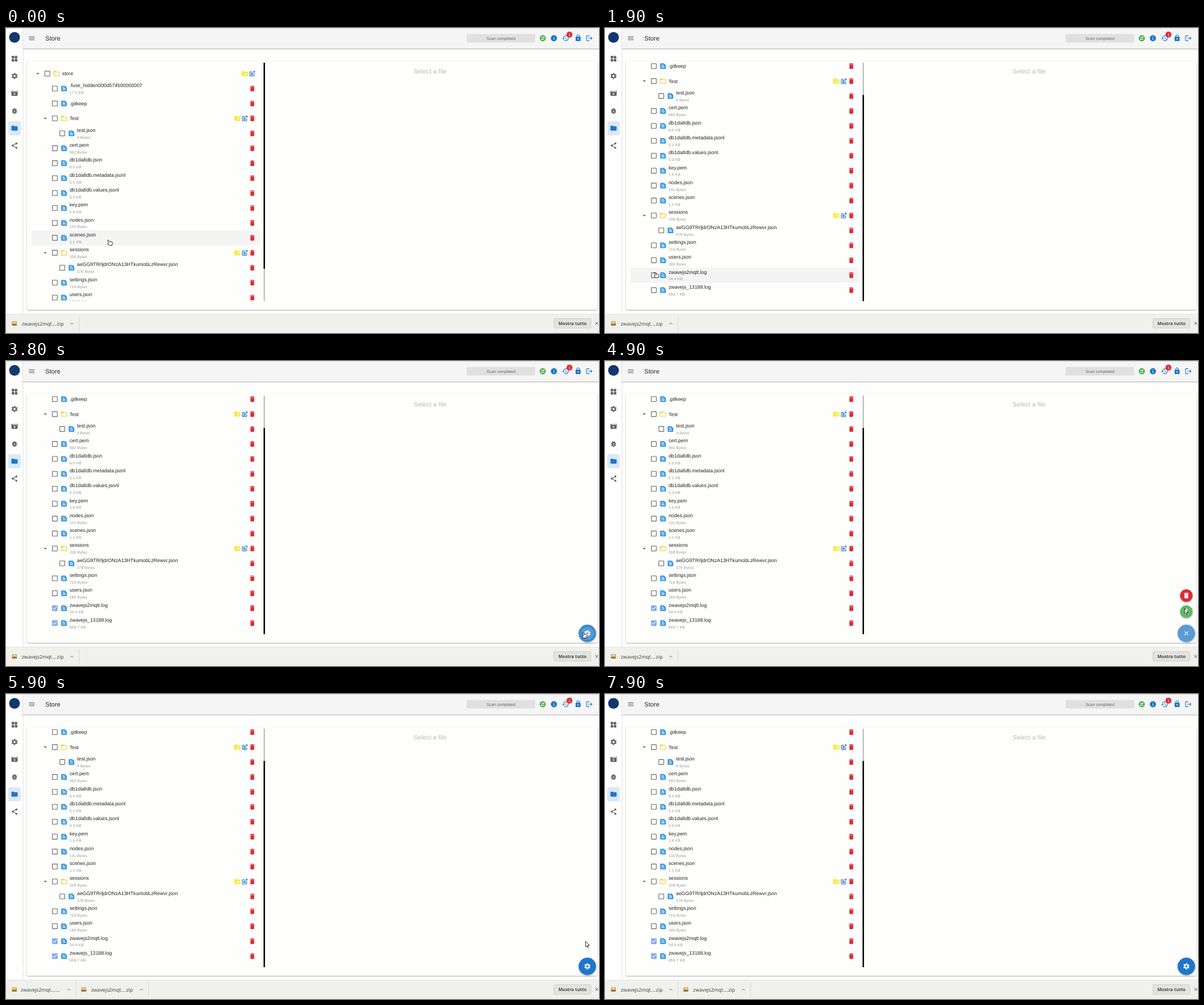
Animation of 1044x537 px, one loop 8000 ms. Source, as an HTML page:

```html
<!DOCTYPE html>
<html lang="en">
<head>
<meta charset="utf-8">
<title>Store</title>
<style>
html, body { margin: 0; width: 100%; height: 100%; overflow: hidden; background: #fefefd; }
svg { display: block; width: 1044px; height: 537px; }
text { font-family: "Liberation Sans", Arial, sans-serif; text-rendering: geometricPrecision; fill: #222; white-space: pre; }
.name { font-size: 8.76px; }
.size { font-size: 6.57px; letter-spacing: .22px; fill: #929292; }
.title { font-size: 10.96px; letter-spacing: .137px; }
.shelf { font-family: "Noto Sans", "Open Sans", sans-serif; font-size: 8.67px; fill: #444; }
.card { filter: drop-shadow(0 1px 1px #0005); }
.fab { filter: drop-shadow(0 1.5px 1.5px #0005); }
</style>
</head>
<body>
<svg viewBox="0 0 1044 537">
  <defs><clipPath id="view"><rect x="40" y="61" width="413" height="420"/></clipPath></defs>
  <g id="page"></g>
  <g id="live"></g>
</svg>
<script>
const LOOP = 8000, STEP = 100, PITCH = 26.29, MAX_SCROLL = 65.7;
const BLUE = '#1f76cc', LIGHT_BLUE = '#5a9bd5', RED = '#e02b33', GREY = '#616161';

// Icons on a 24 unit grid
const BOX = 'M19,3H5A2,2 0 0 0 3,5V19A2,2 0 0 0 5,21H19A2,2 0 0 0 21,19V5A2,2 0 0 0 19,3Z';
const FOLDER = 'M10,4H4A2,2 0 0 0 2,6V18A2,2 0 0 0 4,20H20A2,2 0 0 0 22,18V8A2,2 0 0 0 20,6H12Z';
const DISC = 'M12,2A10,10 0 0 0 12,22A10,10 0 0 0 12,2Z';
const ICONS = {
  menu: 'M3,6H21V8H3ZM3,11H21V13H3ZM3,16H21V18H3Z',
  widgets: 'M13,13V21H21V13ZM3,21H11V13H3ZM3,3V11H11V3ZM16.7,1.7L11,7.3 16.7,13 22.3,7.3Z',
  movie: 'M18,4L20,8H17L15,4H13L15,8H12L10,4H8L10,8H7L5,4H4A2,2 0 0 0 2,6V18A2,2 0 0 0 4,20H20A2,2 0 0 0 22,18V4ZM12,10L13.2,12.8 16,14 13.2,15.2 12,18 10.8,15.2 8,14 10.8,12.8Z',
  bug: 'M20,8H17.2L15.4,6 17,4.4 15.6,3 13.4,5.2H10.6L8.4,3 7,4.4 8.6,6 6.8,8H4V10H6V12H4V14H6V16H4V18H6.8A6,6 0 0 0 17.2,18H20V16H18V14H20V12H18V10H20ZM10,10H14V12H10ZM10,14H14V16H10Z',
  folder: FOLDER,
  folderOpen: FOLDER + 'M20,18H4V8H20Z',
  folderAdd: FOLDER + 'M19,14H16V17H14V14H11V12H14V9H16V12H19Z',
  fileAdd: 'M17,19H5V7H12V5H5A2,2 0 0 0 3,7V19A2,2 0 0 0 5,21H17A2,2 0 0 0 19,19V12H17ZM19,2H17V5H14V7H17V10H19V7H22V5H19ZM7,9H15V11H7ZM7,12H15V14H7ZM7,15H15V17H7Z',
  file: 'M20.4,8.4L15.6,3.6A2,2 0 0 0 14.2,3H5A2,2 0 0 0 3,5V19A2,2 0 0 0 5,21H19A2,2 0 0 0 21,19V9.8A2,2 0 0 0 20.4,8.4ZM7,7H14V9H7ZM17,17H7V15H17ZM17,13H7V11H17Z',
  trash: 'M19,4H15.5L14.5,3H9.5L8.5,4H5V6H19ZM6,19A2,2 0 0 0 8,21H16A2,2 0 0 0 18,19V7H6Z',
  down: 'M7,10L12,15 17,10Z',
  off: BOX + 'M19,5V19H5V5Z',
  on: BOX + 'M10,17L5,12 6.4,10.6 10,14.2 17.6,6.6 19,8Z',
  swap: DISC + 'M18,9L14.5,5.5V8H7V10H14.5V12.5ZM6,15L9.5,11.5V14H17V16H9.5V18.5Z',
  info: DISC + 'M11,7H13V9H11ZM11,11H13V17H11Z',
  history: 'M13.5,8H12V13L16.3,15.5 17,14.3 13.5,12.2ZM13,3A9,9 0 0 0 4,12H1L5,16 9,12H6A7,7 0 1 1 8.1,16.9L6.6,18.4A9,9 0 1 0 13,3Z',
  lock: 'M18,8H17V6A5,5 0 0 0 7,6V8H6A2,2 0 0 0 4,10V20A2,2 0 0 0 6,22H18A2,2 0 0 0 20,20V10A2,2 0 0 0 18,8ZM9,8V6A3,3 0 0 1 15,6V8ZM12,13A2,2 0 0 0 12,17A2,2 0 0 0 12,13Z',
  exit: 'M17,7L15.6,8.4 18.2,11H8V13H18.2L15.6,15.6 17,17 22,12ZM4,5H12V3H4A2,2 0 0 0 2,5V19A2,2 0 0 0 4,21H12V19H4Z',
  close: 'M19,6.4L17.6,5 12,10.6 6.4,5 5,6.4 10.6,12 5,17.6 6.4,19 12,13.4 17.6,19 19,17.6 13.4,12Z',
  save: 'M5,20H19V18H5ZM19,9H15V3H9V9H5L12,16Z',
  tray: 'M16,2H8V9H3L12,18 21,9H16ZM1,26H23V28H1Z',
};

// name, size, depth, folder
const ROWS = [
  ['store', '', 0, 1],
  ['.fuse_hidden000d574500000007', '17.1 KB', 1],
  ['.gitkeep', '', 1],
  ['Test', '', 1, 1],
  ['test.json', '4 Bytes', 2],
  ['cert.pem', '992 Bytes', 1],
  ['db1da8db.json', '6.0 KB', 1],
  ['db1da8db.metadata.jsonl', '5.1 KB', 1],
  ['db1da8db.values.jsonl', '5.3 KB', 1],
  ['key.pem', '1.6 KB', 1],
  ['nodes.json', '131 Bytes', 1],
  ['scenes.json', '1.1 KB', 1],
  ['sessions', '208 Bytes', 1, 1],
  ['aeGG9TRrljdrONzA13HTkumobLzRewvr.json', '378 Bytes', 2],
  ['settings.json', '719 Bytes', 1],
  ['users.json', '186 Bytes', 1],
  ['zwavejs2mqtt.log', '34.4 KB', 1],
  ['zwavejs_13188.log', '659.7 KB', 1],
];
const CHECKED_AT = { 16: 2000, 17: 2500 };
const HOVER = [[0, 11], [500, 12], [800, 14], [900, 16], [1000, 17], [1300, 16], [2300, 17], [3000, -1]];
const PATH = [
  [0, 183, 378], [300, 183, 378], [700, 173, 394], [1100, 99, 472], [1200, 99, 472],
  [1300, 91, 440], [1400, 91, 440], [1500, 91, 429], [1800, 91, 429], [1900, 90.5, 435],
  [2100, 90.5, 437], [2300, 90.5, 462], [2700, 90.5, 462], [3200, 1006, 491], [3500, 1006, 491],
  [3700, 1018.5, 483], [4100, 1018.5, 483], [4400, 1023, 446], [4600, 1023.5, 441], [LOOP, 1023.5, 441],
];

const ramp = (t, from, to) => Math.min(1, Math.max(0, (t - from) / (to - from)));
const easeOut = p => 1 - (1 - p) ** 2;
const rect = (x, y, w, h, fill, more = '') =>
  `<rect x="${x}" y="${y}" width="${w}" height="${h}" fill="${fill}" ${more}/>`;
const circle = (x, y, r, fill, more = '') => `<circle cx="${x}" cy="${y}" r="${r}" fill="${fill}" ${more}/>`;
const text = (x, y, s, cls, more = '') => `<text x="${x}" y="${y}" class="${cls}" ${more}>${s}</text>`;
const icon = (name, x, y, fill, scale = .548) =>
  `<path d="${ICONS[name]}" fill="${fill}" fill-rule="evenodd" transform="translate(${x} ${y}) scale(${scale}) translate(-12 -12)"/>`;
const gear = (x, y, color, turn = 0) =>
  `<g transform="translate(${x} ${y}) scale(.548) rotate(${turn})" fill="none" stroke="${color}">
  <circle r="5.4" stroke-width="3.8"/>
  <circle r="8.4" stroke-width="3" pathLength="12" stroke-dasharray="1 1" stroke-dashoffset="-.5"/></g>`;

function drawPage() {
  let s = '';
  // Side bar and tool bar
  s += rect(0, 0, 30, 504, '#fff') + rect(29.5, 36, 1, 468, '#e0e0e0');
  s += `<g class="card">${rect(30, 0, 1014, 36, '#f5f5f5')}</g>` + rect(0, 0, 1044, 1, '#d6d6d4');
  s += circle(15, 16.5, 9.5, '#12386f');
  s += rect(4, 164, 22, 25, '#dce9f6', 'rx="2"');
  s += icon('widgets', 15, 54, GREY) + gear(15, 84.5, GREY) + icon('movie', 15, 115, GREY);
  s += icon('bug', 15, 146, GREY) + icon('folder', 15, 176.3, BLUE);
  s += `<path d="M18.3 203.2L11.7 207 18.3 210.9" fill="none" stroke="${GREY}" stroke-width="1.1"/>`;
  for (const [x, y] of [[18.3, 203.2], [11.7, 207], [18.3, 210.9]]) s += circle(x, y, 1.7, GREY);
  s += icon('menu', 45.3, 18, GREY) + text(69.2, 22, 'Store', 'title');
  s += rect(811, 10.5, 120.5, 15, '#e0e0e0', 'rx="2"');
  s += text(871.5, 20.7, 'Scan completed', '', 'font-size="7.12" text-anchor="middle" style="fill:#666"');
  s += icon('swap', 945, 18, '#4caf50') + icon('info', 964.6, 18, BLUE) + icon('history', 985.3, 18, BLUE);
  s += icon('lock', 1007.2, 17.5, BLUE) + icon('exit', 1027, 18, BLUE);
  s += circle(992, 11.5, 5.2, RED) + text(992, 14, '1', '', 'font-size="6.6" text-anchor="middle" style="fill:#fff"');
  // Card
  s += `<g class="card">${rect(37, 58, 1004, 438, '#fefefd', 'rx="2"')}</g>`;
  s += text(746.8, 80, 'Select a file', 'title', 'text-anchor="middle" style="fill:#b8b8b8"');
  s += rect(453.5, 61, 2.5, 420, '#c1c1c1');
  // Download shelf
  s += rect(0, 503.5, 1044, 33.5, '#f0f0ec') + rect(0, 503.5, 1044, .7, '#d9d9d5');
  s += rect(964.7, 511.7, 65, 16.6, '#e3e3df', 'rx="2" stroke="#c2c2be" stroke-width=".7"');
  s += text(997.3, 523, 'Mostra tutto', 'shelf', 'text-anchor="middle" style="font-size:7.8px;font-weight:600"');
  s += icon('close', 1040, 520, '#555', .38);
  return s;
}

function drawRow([name, size, depth, isFolder], i, t, scroll) {
  const y = 80.3 + i * PITCH - scroll, dx = depth * 13.15;
  const on = t >= CHECKED_AT[i], age = t - CHECKED_AT[i];
  let s = '';
  if (isFolder) s += icon('down', 56 + dx, y, GREY);
  if (age >= 0 && age < 300) s += circle(72.8 + dx, y, 6 + age / 60, '#82b1ff', 'opacity=".2"');
  s += icon(on ? 'on' : 'off', 72.8 + dx, y, on ? '#82abef' : '#666');
  s += isFolder ? icon('folderOpen', 89 + dx, y, '#f5cc2b') : icon('file', 89 + dx, y, '#2b93e4');
  s += text(98.8 + dx, y + (size ? -2.6 : 3.1), name, 'name');
  if (size) s += text(98.8 + dx, y + 9.2, size, 'size');
  const right = 433.6 - (depth ? 13.15 : 0);
  if (isFolder) s += icon('folderAdd', right - 13.15, y, '#f5ec3e') + icon('fileAdd', right, y, BLUE);
  if (depth) s += icon('trash', 433.6, y, RED);
  return s;
}

function drawTree(t) {
  const scroll = t < 400 ? 0 : MAX_SCROLL * easeOut(ramp(t, 300, 850));
  const hover = HOVER.filter(h => h[0] <= t).pop()[1];
  let s = '<g clip-path="url(#view)">';
  if (hover >= 0) s += rect(45, 67.2 + hover * PITCH - scroll, 402, PITCH, '#f4f4f4');
  s += ROWS.map((row, i) => drawRow(row, i, t, scroll)).join('') + '</g>';
  return s + rect(453.5, 61 + scroll * .866, 2.5, 363, '#000');
}

function button(x, y, r, fill, scale, content) {
  if (!scale) return '';
  return `<g transform="translate(${x} ${y}) scale(${scale})"><g class="fab">${circle(0, 0, r, fill)}</g>${content}</g>`;
}

function drawFab(t) {
  const dial = ramp(t, 3900, 4200) * (1 - ramp(t, 5000, 5300));
  const lit = t >= 3600 && t < 5200;
  let s = button(1023.5, 413, 11, RED, dial, icon('trash', 0, 0, '#fff'));
  s += button(1023.5, 441.3, 11, t >= 4500 ? '#5fb964' : '#4caf50', ramp(dial, .2, 1), icon('save', 0, 0, '#fff'));
  const ripple = lit && t < 4000 ? circle(0, 0, 11 * ramp(t, 3600, 3800), LIGHT_BLUE) : '';
  const fill = !lit ? BLUE : t < 4000 ? '#3f8acb' : LIGHT_BLUE;
  const face = dial > .5 ? icon('close', 0, 0, '#fff') : gear(0, 0, '#fff', dial * 90);
  return s + button(1023.5, 479.5, 15.3, fill, ramp(t, 1900, 2200), ripple + face);
}

function download(x, width, label, textX) {
  let s = rect(x + 10.5, 516.3, 8.6, 7.6, '#d3ac68', 'rx=".8"') + rect(x + 10.5, 521, 8.6, 2.9, '#9a7440', 'rx=".8"');
  s += rect(x + 12.5, 518, 4.6, 1.2, '#fff3d6');
  s += text(x + textX, 523.6, label, 'shelf');
  s += `<path d="M${x + width - 15.3} 521.8l2.5-2.5 2.5 2.5" fill="none" stroke="#666"/>`;
  return s + rect(x + width - .4, 507, .8, 27, '#d0d0cc');
}

function drawShelf(t) {
  const label = 'zwavejs2mqt….zip', tight = t >= 5500 && t < 6200;
  let s = tight ? download(0, 123.3, 'zwavejs2mqt….…', 26) : download(0, 128.7, label, 27.8);
  if (t >= 5500) {
    const x = tight ? 123.3 : 128.7;
    s += `<g opacity="${ramp(t, 5400, 5700)}">${download(x - 1.2, 128.8, label, 27.6)}</g>`;
  }
  const p = ramp(t, 5320, 5920);
  if (p > 0 && p < 1)
    s += `<g opacity="${(4 * p * (1 - p)) ** 1.5}">${icon('tray', 19.5, 485 - 35 * (1 - p), '#a5a9ad', .65)}</g>`;
  return s;
}

function drawCursor(t) {
  if (t >= 6900) return '';
  const k = PATH.findIndex(q => q[0] > t), [t0, x0, y0] = PATH[k - 1], [t1, x1, y1] = PATH[k];
  const p = ramp(t, t0, t1), x = x0 + (x1 - x0) * p, y = y0 + (y1 - y0) * p;
  const hand = t < 4800 && (x < 450 || x > 1008);
  const d = hand
    ? 'M-4.4,-4.2Q-3.6,-5.2 -2.6,-4.2L-.4,-1.7 3.2,-1.2Q4.6,-.8 4.4,.8L3.6,4.6H-2L-4.4,1.6Q-4.2,.4 -2.2,1.2L-1.6,.6Z'
    : 'M-3.2,-5.4V4.2L-1,2.2 .4,5.5 2,4.8 .6,1.6H3.6Z';
  return `<path d="${d}" transform="translate(${x} ${y})" fill="#fff" stroke="#111" stroke-width=".9" stroke-linejoin="round"/>`;
}

const page = document.getElementById('page'), live = document.getElementById('live');
page.innerHTML = drawPage();
let shown = -1;
function tick() {
  const t = Math.floor(performance.now() % LOOP / STEP) * STEP;
  if (t !== shown) {
    shown = t;
    live.innerHTML = drawTree(t) + drawFab(t) + drawShelf(t) + drawCursor(t);
  }
  requestAnimationFrame(tick);
}
tick();
</script>
</body>
</html>
```
